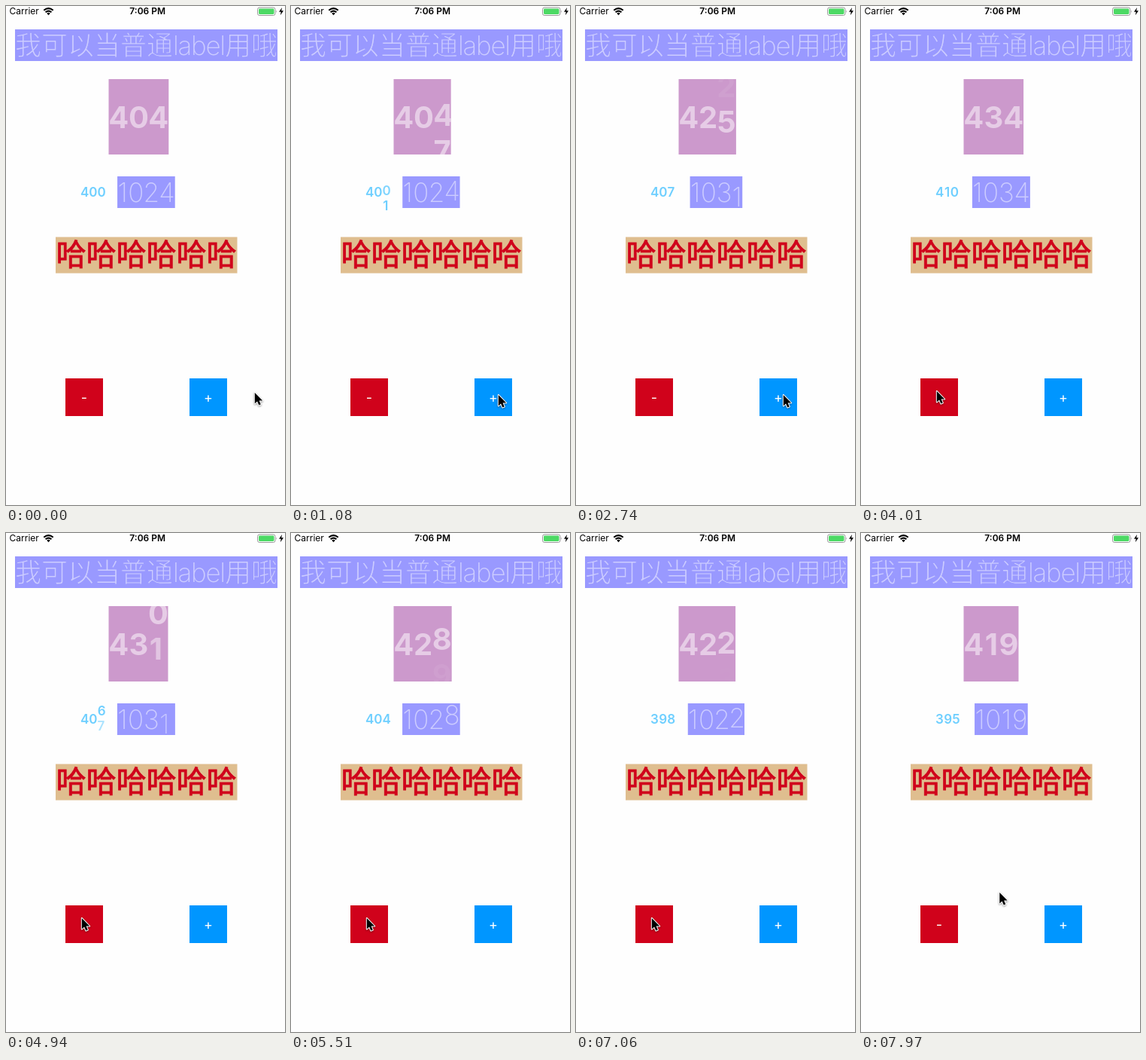
Write an HTML page that moves like this. It is 371 px wide and 662 px high and loops after 8 s.

```html
<!DOCTYPE html>
<html lang="zh">
<head>
<meta charset="utf-8">
<title>Rolling labels</title>
<style>
  html, body { margin: 0; width: 100%; height: 100%; overflow: hidden; background: #fefefe; }
  svg { display: block; width: 371px; height: 662px; font-family: Inter, "Noto Sans CJK SC", sans-serif; }
  .mid { text-anchor: middle; }
  .thin { font-size: 35px; font-weight: 200; fill: #ccccff; }
  .bold { font-size: 40px; font-weight: 700; fill: #fff; fill-opacity: .5; }
  .small { font-size: 17px; font-weight: 600; fill: #6ecfff; }
  .button { font-size: 18px; fill: #fff; text-anchor: middle; }
  .status { font-size: 12px; }
  /* an outline in the background colour slims the Chinese strokes */
  .slim { font-family: "Noto Sans CJK SC", sans-serif; stroke: #9999ff; stroke-width: 1.1px; }
  .tight { letter-spacing: -1.3px; }
  .laugh { font-family: "Noto Sans CJK SC", sans-serif; font-size: 40px; fill: #d0021b; stroke: #d0021b; stroke-width: .9px; }
</style>
</head>
<body>
<svg viewBox="0 0 371 662">
  <defs>
    <clipPath id="clipBig"><rect y="97" height="100"/></clipPath>
    <clipPath id="clipThin"><rect y="226" height="42"/></clipPath>
  </defs>

  <!-- status bar -->
  <text class="status" x="4.6" y="11.4">Carrier</text>
  <g fill="none" stroke="#000" stroke-width="2.1">
    <path d="M50.3 5.8Q56.5 .3 62.7 5.8"/>
    <path d="M52.6 8.3Q56.5 4.9 60.4 8.3"/>
  </g>
  <path d="M54.2 9.7Q56.5 7.9 58.8 9.7L56.5 12.2Z"/>
  <text class="status mid" x="188.2" y="11.4" font-weight="600">7:06 PM</text>
  <rect x="334.5" y="2" width="23.5" height="10.5" rx="2.6" fill="none" stroke="#999"/>
  <rect x="336" y="3.5" width="20.5" height="7.5" rx="1.4" fill="#4cd964"/>
  <path d="M359.3 5.5Q361 7.2 359.3 9Z" fill="#999"/>
  <path d="M367 2L363 7.8H365.7L364.8 12.3L369 6.2H366.2Z"/>

  <!-- fixed labels and buttons -->
  <rect x="12" y="31" width="349" height="42" fill="#9999ff"/>
  <text class="thin mid" x="186.5" y="65"><tspan class="slim">我可以当普通</tspan><tspan class="tight">label</tspan><tspan class="slim">用哦</tspan></text>
  <rect x="66" y="306.5" width="241.5" height="48" fill="#dfbe8f"/>
  <text class="laugh mid" x="186.7" y="343.8">哈哈哈哈哈哈</text>
  <rect x="79" y="494" width="50" height="50" fill="#d0021b"/>
  <text class="button" x="104" y="526">-</text>
  <rect x="244" y="494" width="50" height="50" fill="#0096ff"/>
  <text class="button" x="269" y="526">+</text>

  <!-- rolling labels -->
  <rect id="boxBig" y="97" height="100" fill="#cc99cc"/>
  <g clip-path="url(#clipBig)"><g id="big" class="bold mid"></g></g>
  <rect id="boxThin" y="226" height="42" fill="#9999ff"/>
  <g clip-path="url(#clipThin)"><g id="thin" class="thin mid"></g></g>
  <g id="small" class="small mid"></g>

  <path id="cursor" d="M.8 0V14.6L4.1 11.5L6.3 16.6L8.8 15.5L6.6 10.6H11.2Z" stroke="#fff" stroke-width="2" paint-order="stroke" stroke-linejoin="round" style="filter:drop-shadow(0 1px 1px #0006)"/>
</svg>
<script>
const LOOP = 8000, TAPS_UP = 10;
const $ = id => document.getElementById(id);

// Digit advances 0-9 in em
const BOLD = [.655, .5, .61, .65, .67, .63, .655, .58, .65, .655];
const THIN = [.61, .4, .57, .58, .61, .6, .62, .54, .61, .61];

const GAP_DOWN = 209;
const taps = [1070, 1350, 1620, 1870, 2100, 2320, 2527, 2800, 3080, 3350];
for (let i = 0; i < 15; i++) taps.push(4284 + GAP_DOWN * i + (i < 10 ? 0 : 276));

const labels = [
  { id: 'big', first: 404, step: 3, em: BOLD, size: 40, left: 136.5, base: 161.5, travel: 47.7, speed: 1, box: 'boxBig', clip: 'clipBig' },
  { id: 'thin', first: 1024, step: 1, em: THIN, size: 35, center: 186.4, base: 259.8, travel: 41.8, speed: 1, box: 'boxThin', clip: 'clipThin' },
  { id: 'small', first: 400, step: 1, em: BOLD, size: 17, left: 99, base: 253.2, travel: 20.3, speed: 3 }
];

// start, end, from, to
const moves = [
  [60, 720, [330, 513], [275, 516]],
  [3580, 4010, [275, 516], [100, 511]],
  [7680, 7970, [100, 511], [183.5, 477]]
];

const clamp = v => Math.max(0, Math.min(1, v));
const smooth = v => v * v * (3 - 2 * v);

function valueAfter(label, n) {
  return label.first + label.step * Math.min(n, TAPS_UP) - Math.max(0, n - TAPS_UP);
}

function digit(char, x, y, opacity = 1) {
  return `<text x="${x.toFixed(2)}" y="${y.toFixed(2)}" opacity="${opacity.toFixed(3)}">${char}</text>`;
}

function drawLabel(label, count, progress) {
  const now = String(valueAfter(label, count));
  const old = String(valueAfter(label, Math.max(0, count - 1)));
  const dir = count > TAPS_UP ? -1 : 1;
  const p = clamp(progress * label.speed);
  const advance = d => label.em[d] * label.size;
  const width = [...now].reduce((sum, d) => sum + advance(d), 0);
  const left = label.left ?? label.center - width / 2;
  let x = left, out = '';
  [...now].forEach((d, i) => {
    const rolling = d !== old[i] && p < 1;
    const shift = rolling ? dir * (1 - p) * label.travel : 0;
    out += digit(d, x + advance(d) / 2, label.base + shift);
    if (rolling) out += digit(old[i], x + advance(old[i]) / 2, label.base - dir * p * label.travel, 1 - p);
    x += advance(d);
  });
  $(label.id).innerHTML = out;
  if (!label.box) return;
  for (const rect of [$(label.box), $(label.clip).firstElementChild]) {
    rect.setAttribute('x', left);
    rect.setAttribute('width', width);
  }
}

function drawCursor(t) {
  let [x, y] = moves[0][2];
  for (const [start, end, from, to] of moves) {
    if (t < start) break;
    const k = smooth(clamp((t - start) / (end - start)));
    x = from[0] + (to[0] - from[0]) * k;
    y = from[1] + (to[1] - from[1]) * k;
  }
  $('cursor').setAttribute('transform', `translate(${x} ${y})`);
}

function draw(t) {
  const count = taps.filter(tap => tap <= t).length;
  const start = taps[count - 1] ?? 0;
  const longest = count > TAPS_UP ? GAP_DOWN : 250;
  const duration = Math.min(longest, (taps[count] ?? LOOP) - start);
  const progress = count ? (t - start) / duration : 1;
  for (const label of labels) drawLabel(label, count, progress);
  drawCursor(t);
}

const origin = performance.now();
function tick() {
  draw((performance.now() - origin) % LOOP);
  requestAnimationFrame(tick);
}
tick();
</script>
</body>
</html>
```
